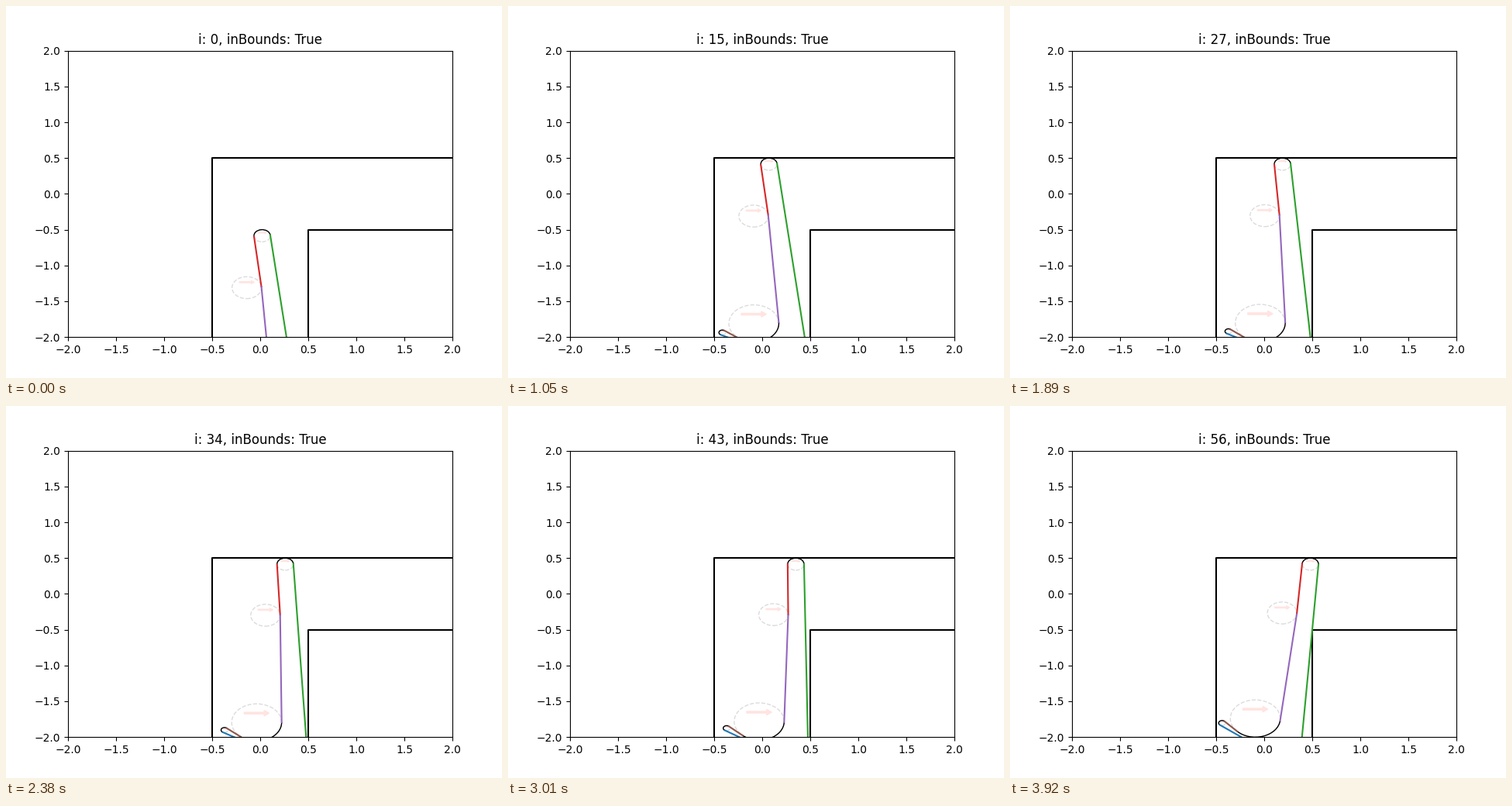
These frames come from a looping animation (640x480 px, 3.99 s). A matplotlib script:

```python
import numpy as np
import matplotlib.pyplot as plt
from matplotlib.animation import FuncAnimation
from matplotlib.patches import Arc, Circle, FancyArrow

FRAMES, INTERVAL = 57, 70
WALL, CORNER = 0.5, (0.5, -0.5)

# Radii of the guide circles and their offsets from the tip circle
R_TIP, R_SIDE, R_NOTCH, R_END = 0.085, 0.153, 0.26, 0.035
SIDE, NOTCH, END = (-0.16, -0.725), (-0.157, -2.225), (-0.485, -2.352)
START_ANGLE = 6.76
END_ANGLE = 26.3

fig, ax = plt.subplots(figsize=(6.4, 4.8), dpi=100)


def unit(deg):
    a = np.radians(deg)
    return np.array([np.cos(a), np.sin(a)])


def tip_at(i):
    """Straight up to the wall, then sliding right along it."""
    lift = 0.099 * i - 1 if i <= 10 else 0
    return np.array([0.02 + 0.01 * max(0, i - 10), WALL - R_TIP + lift])


def lean_at(i, tip):
    """Lean of the long right edge, limited by the walls and the inner corner."""
    if i <= 10:
        return START_ANGLE
    a, b = CORNER[0] - tip[0], tip[1] - CORNER[1]
    corner = np.degrees(np.arccos(R_TIP / np.hypot(a, b)) - np.arctan2(b, a))
    return min(START_ANGLE, 0.95 - 0.244 * (i - 43), corner)


def tangent(p, rp, q, rq):
    """Common tangent of two circles; the sign of a radius picks the side."""
    d = q - p
    angle = np.degrees(np.arctan2(d[1], d[0])
                       + np.arccos((rp - rq) / np.hypot(*d)))
    n = unit(angle)
    return p + rp * n, q + rq * n, angle


def segment(p, q, color):
    ax.plot([p[0], q[0]], [p[1], q[1]], color=color, lw=1.5)


def guide(c, r):
    ax.add_patch(Circle(c, r, fill=False, ls="--", lw=1, ec="lightgray",
                        alpha=0.8))
    ax.add_patch(FancyArrow(c[0] - r / 2, c[1] + r / 2, r, 0,
                            width=0.09 * r, head_width=0.3 * r,
                            head_length=0.2 * r, length_includes_head=True,
                            color="mistyrose", lw=1))


def arc(c, r, start, stop):
    start, stop = start % 360, stop % 360
    ax.add_patch(Arc(c, 2 * r, 2 * r, theta1=start, theta2=stop,
                     color="black", lw=1))


def draw(i):
    ax.clear()
    ax.set_xlim(-2, 2)
    ax.set_ylim(-2, 2)
    ax.set_title(f"i: {i}, inBounds: True")
    ax.plot([-WALL, -WALL, 3], [-3, WALL, WALL], color="black", lw=1.5)
    ax.plot([WALL, WALL, 3], [-3, -WALL, -WALL], color="black", lw=1.5)

    tip = tip_at(i)
    lean = lean_at(i, tip)
    turn = START_ANGLE - lean
    c, s = unit(turn)
    rotation = np.array([[c, s], [-s, c]])
    side, notch, end = (tip + rotation @ np.array(p)
                        for p in (SIDE, NOTCH, END))

    for center, r in ((tip, R_TIP), (side, R_SIDE),
                      (notch, R_NOTCH), (end, R_END)):
        guide(center, r)

    upper_a, upper_b, upper = tangent(tip, -R_TIP, side, R_SIDE)
    lower_a, lower_b, lower = tangent(side, R_SIDE, notch, R_NOTCH)
    hook_a, hook_b, hook = tangent(notch, R_NOTCH, end, -R_END)
    base = 270 - END_ANGLE - turn

    arc(tip, R_TIP, lean, upper + 180)
    arc(side, R_SIDE, lower, upper)
    arc(notch, R_NOTCH, hook, lower)
    arc(end, R_END, hook + 180, base)

    base_start = end + R_END * unit(base)
    edge_start = tip + R_TIP * unit(lean)
    segment(base_start, base_start + 1.5 * unit(base + 90), "C0")
    segment(edge_start, edge_start + 3 * unit(lean - 90), "C2")
    segment(upper_a, upper_b, "C3")
    segment(lower_a, lower_b, "C4")
    segment(hook_a, hook_b, "C5")
    return []


anim = FuncAnimation(fig, draw, frames=FRAMES, interval=INTERVAL,
                     init_func=lambda: [], repeat=True, repeat_delay=0)
plt.show()
```
